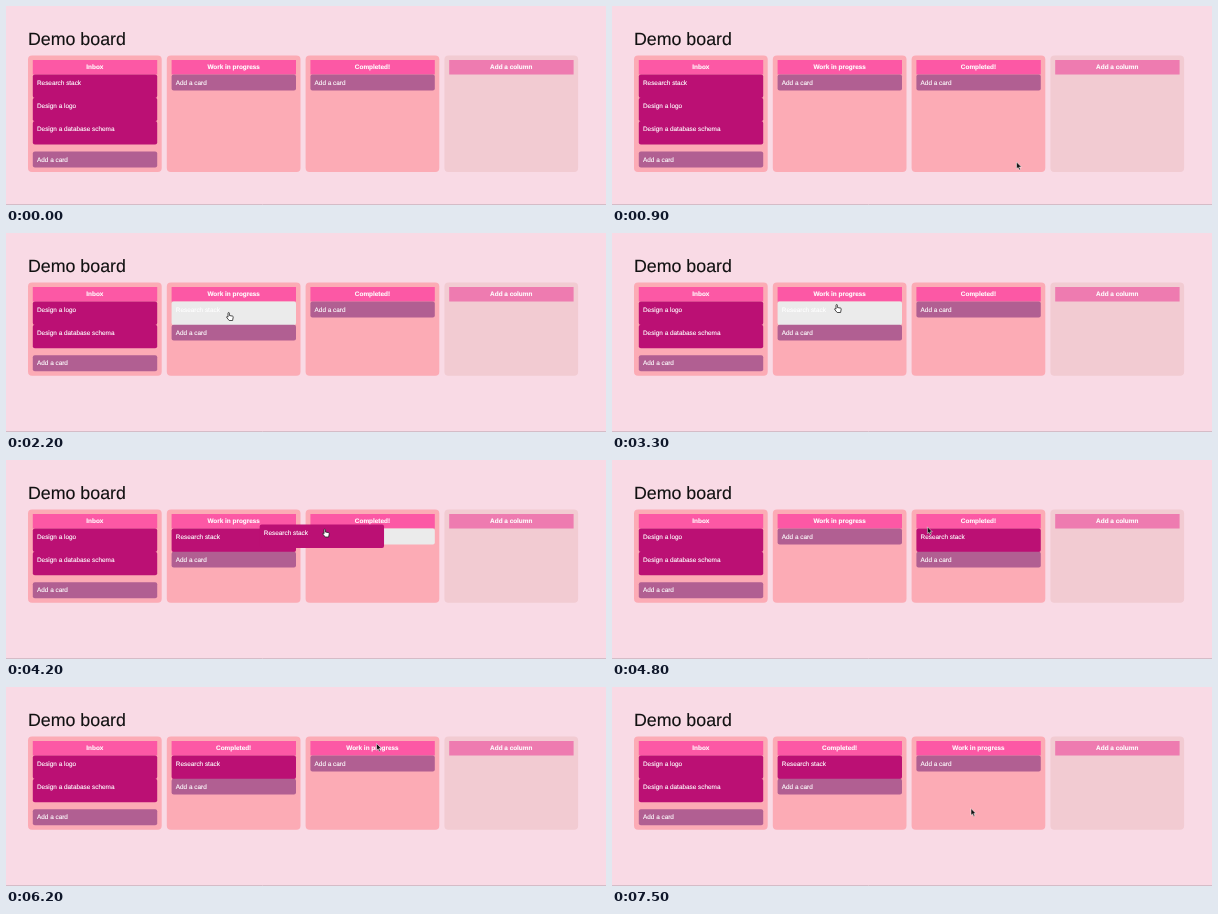
These frames come from a looping animation (600 by 199 pixels, 7600 ms). An HTML page:

```html
<!DOCTYPE html>
<html lang="en">
<head>
<meta charset="utf-8">
<title>Demo board</title>
<style>
  html, body { margin: 0; width: 100%; height: 100%; overflow: hidden; background: #f9dae5; }
  svg { display: block; width: 600px; height: 199px; }
  text {
    font: 6.4px "Liberation Sans", Arial, sans-serif;
    fill: #fff; stroke: #fff; stroke-width: .12; text-rendering: geometricPrecision;
  }
  .title { font-size: 17.8px; fill: #111; stroke: #111; }
  .head { font-weight: bold; text-anchor: middle; }
</style>
</head>
<body>
<svg viewBox="0 0 600 199">
  <path d="M0 198.5H600" stroke="#d5bcc7"/>
  <text class="title" x="22" y="38.7">Demo board</text>
  <g id="board"></g>
  <g id="drag"></g>
  <g id="pointer"></g>
</svg>
<script>
const LOOP = 7600, STEP = 100;
const LEFT = 22, TOP = 49.5, PITCH = 138.8, COL_W = 133.7, PAD = 4.8;
const ITEM_W = 124.4, ITEM_TOP = 68.5, CARD_H = 23.2, ADD_H = 15.6;
const CARD = '#bb1074', ADD = '#b15f92', HOVER = '#ebebeb';

// Pointer moves; those with a column index drag its first card or the whole column
const ENTRY = { x: 594, y: 170, time: 400 };
const MOVES = [
  { from: 400, to: 500, x: 470, y: 175 },
  { from: 700, to: 1400, x: 140, y: 79.5 },
  { from: 1400, to: 2100, x: 222, y: 79.5, card: 0 },
  { from: 2300, to: 2500, x: 224, y: 71.5 },
  { from: 3300, to: 3600, x: 230, y: 73 },
  { from: 3600, to: 4300, x: 323.2, y: 68.8, card: 1 },
  { from: 4600, to: 5300, x: 284, y: 59 },
  { from: 5600, to: 6200, x: 370.5, y: 56.5, column: 1 },
  { from: 6500, to: 7200, x: 359, y: 121.5 }
];

const ARROW = '<path d="M0 0V6.8L1.6 5.4L2.7 7.9L3.9 7.4L2.8 5H4.9Z" fill="#111" stroke="#fff" stroke-width=".5"/>';
const HAND = '<path d="M0 .7C0 -.2 1.4 -.2 1.4 .7V3L4.6 3.6Q5.3 3.8 5.2 4.7L4.6 8H1.2L-1.3 5C-1.7 4.1 -.8 3.7 0 4.7Z" ' +
  'fill="#fff" stroke="#222" stroke-width=".8" stroke-linejoin="round"/>';

const $ = id => document.getElementById(id);
const ease = u => u * u * (3 - 2 * u);
const rect = (x, y, w, h, r, fill) =>
  `<rect x="${x}" y="${y}" width="${w}" height="${h}" rx="${r}" fill="${fill}"/>`;
const label = (x, y, s, cls = '') => `<text class="${cls}" x="${x}" y="${y}">${s}</text>`;
const shifted = (x, y, art) => `<g transform="translate(${x} ${y})">${art}</g>`;

function tipAt(t) {
  let { x, y } = ENTRY;
  for (const m of MOVES) {
    if (t <= m.from) break;
    const k = ease(Math.min(1, (t - m.from) / (m.to - m.from)));
    x += (m.x - x) * k;
    y += (m.y - y) * k;
  }
  return { x, y };
}

function columnsAt(t) {
  const cols = [
    { name: 'Inbox', cards: ['Research stack', 'Design a logo', 'Design a database schema'], gap: 7.4 },
    { name: 'Work in progress', cards: [], gap: 0 },
    { name: 'Completed!', cards: [], gap: 0 }
  ];
  for (const { to, card, column } of MOVES) {
    if (t < to) break;
    if (card !== undefined) cols[card + 1].cards.unshift(cols[card].cards.shift());
    if (column !== undefined) cols.splice(column + 1, 0, ...cols.splice(column, 1));
  }
  return cols;
}

function itemsOf(col, i) {
  const x = LEFT + i * PITCH + PAD, n = col.cards.length;
  const cards = col.cards.map((text, k) =>
    ({ x, y: ITEM_TOP + k * CARD_H, h: CARD_H, text, fill: CARD }));
  return [...cards, { x, y: ITEM_TOP + n * CARD_H + col.gap, h: ADD_H, text: 'Add a card', fill: ADD }];
}

const isOver = (it, p) => p.x >= it.x && p.x <= it.x + ITEM_W && p.y >= it.y && p.y <= it.y + it.h;

// A slight overlap hides the seam between stacked cards
const drawItem = (it, hot) =>
  rect(it.x, it.y, ITEM_W, it.h + .3, 2, hot ? HOVER : it.fill) + label(it.x + 4.2, it.y + 10, it.text);

function drawColumn(name, i, h, items, hot, fill = '#fcabb5', head = '#fc58a5') {
  const x = LEFT + i * PITCH;
  return rect(x, TOP, COL_W, h, 4, fill) +
    rect(x + PAD, 54, ITEM_W, 14.5, 0, head) +
    label(x + COL_W / 2, 63.4, name, 'head') +
    items.map(it => drawItem(it, it === hot)).join('');
}

function drawDrag(t, tip, cols, lists, h) {
  const m = MOVES.find(m => t >= m.from && t < m.to);
  if (!m || (m.card ?? m.column) === undefined) return '';
  const grab = tipAt(m.from);
  const art = m.card !== undefined
    ? drawItem(lists[m.card][0])
    : drawColumn(cols[m.column].name, m.column, h, lists[m.column]);
  return shifted(tip.x - grab.x, tip.y - grab.y, art);
}

function draw(t) {
  const cols = columnsAt(t), lists = cols.map(itemsOf), tip = tipAt(t);
  const h = 46.9 + CARD_H * Math.max(...cols.map(c => c.cards.length));
  // Hover feedback trails the pointer by one step
  const hot = lists.flat().find(it => isOver(it, tipAt(t - STEP)));

  $('board').innerHTML =
    cols.map((c, i) => drawColumn(c.name, i, h, lists[i], hot)).join('') +
    drawColumn('Add a column', 3, h, [], null, '#f2cbd2', '#ee7bb0');
  $('drag').innerHTML = drawDrag(t, tip, cols, lists, h);
  $('pointer').innerHTML = t < ENTRY.time ? '' : shifted(tip.x, tip.y, hot ? HAND : ARROW);
}

let last = -1;
const start = performance.now();
function tick() {
  const t = Math.floor((performance.now() - start) % LOOP / STEP) * STEP;
  if (t !== last) draw(last = t);
  requestAnimationFrame(tick);
}
tick();
</script>
</body>
</html>
```
